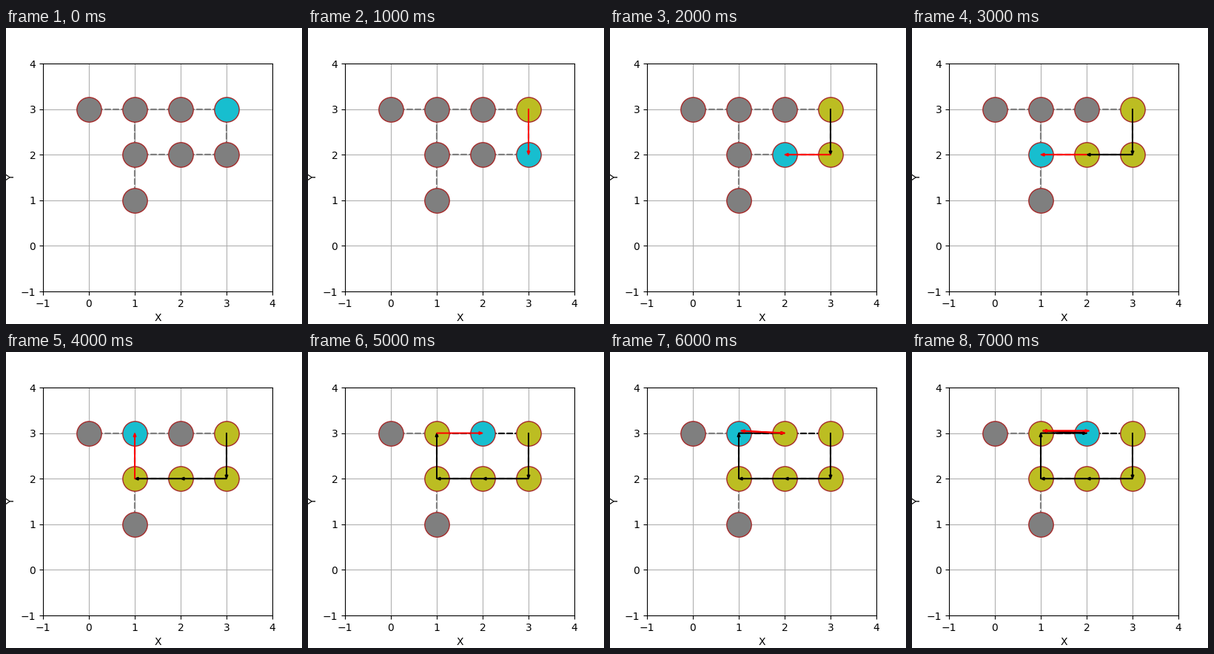
A matplotlib script for the animation above (8000 ms loop, 400x400 px).

```python
import matplotlib.pyplot as plt
from matplotlib.animation import FuncAnimation

MOVES = {"U": (0, 1), "D": (0, -1), "L": (-1, 0), "R": (1, 0)}
SHIFT = 0.05  # keeps repeated moves apart from earlier ones


def trace(start, moves):
    """Grid positions visited from start, one per letter."""
    path = [start]
    for letter in moves:
        (x, y), (dx, dy) = path[-1], MOVES[letter]
        path.append((x + dx, y + dy))
    return path


WALK = trace((3, 3), "DLLURLR")
BRANCHES = [trace((3, 3), "LLL"), trace((1, 2), "D")]

EDGES = sorted({tuple(sorted(pair)) for path in [WALK, *BRANCHES]
                for pair in zip(path, path[1:])})
NODES = sorted({node for edge in EDGES for node in edge})


def arrow_point(i):
    """Walk position, nudged aside when its node is entered again."""
    d = SHIFT if WALK[i] in WALK[:i] else 0
    return WALK[i][0] + d, WALK[i][1] + d


fig, ax = plt.subplots(figsize=(4, 4), dpi=100)


def draw_arrow(start, end, color):
    ax.arrow(*start, end[0] - start[0], end[1] - start[1], width=0.01,
             head_width=0.06, head_length=0.08, length_includes_head=True,
             color=color, zorder=4)


def draw_move(i, color):
    start, end = arrow_point(i), arrow_point(i + 1)
    draw_arrow(start, end, color)
    # a move that turns straight back points both ways
    if i > 0 and WALK[i + 1] == WALK[i - 1]:
        draw_arrow(end, start, color)


def node_color(node, step):
    if node == WALK[step]:
        return "tab:cyan"
    return "tab:olive" if node in WALK[:step] else "tab:gray"


def draw(step):
    ax.clear()
    ax.set(xlim=(-1, 4), ylim=(-1, 4), xlabel="X", ylabel="Y",
           xticks=range(-1, 5), yticks=range(-1, 5))
    ax.grid(True)
    ax.set_axisbelow(True)

    seen = WALK[:step + 1]
    for a, b in EDGES:
        color = "black" if a in seen and b in seen else "tab:gray"
        for ends in ((a, b), (b, a)):
            ax.plot(*zip(*ends), "--", color=color, lw=1.5, zorder=2)
    for node in NODES:
        ax.plot(*node, "o", ms=24, mew=1, mec="brown",
                mfc=node_color(node, step), zorder=3)

    for i in range(step):
        draw_move(i, "red" if i == step - 1 else "black")
    return []


anim = FuncAnimation(fig, draw, frames=len(WALK), init_func=lambda: [],
                     interval=1000, repeat=True, repeat_delay=0)
plt.show()
```
